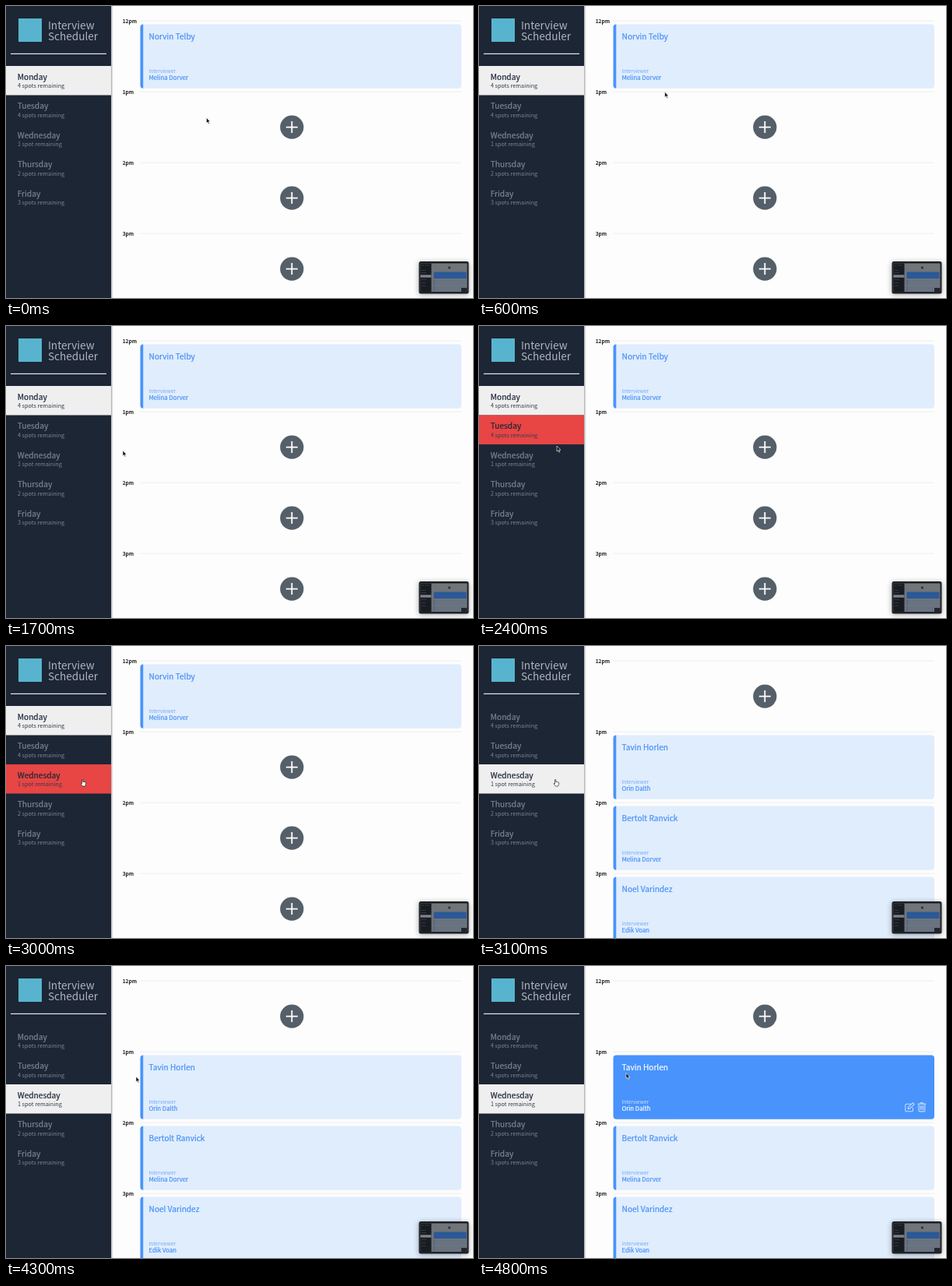
These frames come from a looping animation (600x375 px, 5 s). An HTML page:

```html
<!DOCTYPE html>
<html lang="en">
<head>
<meta charset="utf-8">
<title>Interview Scheduler</title>
<style>
  html, body { margin: 0; width: 100%; height: 100%; overflow: hidden; background: #fdfdfd; }
  svg { display: block; width: 600px; height: 375px; }
  text { font-family: "Noto Sans CJK JP", "Noto Sans CJK SC", "Noto Sans CJK", "Noto Sans", sans-serif; }
</style>
</head>
<body>
<svg id="stage" viewBox="0 0 600 375">
  <defs>
    <filter id="soft" x="-20%" y="-20%" width="140%" height="140%"><feGaussianBlur stdDeviation="1.3"/></filter>
    <filter id="glow" x="-30%" y="-40%" width="160%" height="180%"><feGaussianBlur stdDeviation="3.5"/></filter>
  </defs>
  <g id="schedule"></g>
  <g id="sidebar">
    <rect x="-6" y="-6" width="142" height="387" opacity=".4" filter="url(#soft)"/>
    <rect width="135" height="375" fill="#1c2635"/>
    <rect x="16" y="16" width="30" height="30" fill="#58b4ce"/>
    <g fill="#b0b6bd" font-size="13.6" font-weight="300">
      <text x="53.9" y="30">Interview</text>
      <text x="53.9" y="43.8">Scheduler</text>
    </g>
    <rect x="6" y="60.8" width="123" height="1.2" fill="#e4e6e8"/>
    <g id="days"></g>
  </g>
  <g id="preview">
    <rect x="530" y="329" width="65" height="42" rx="3" opacity=".3" filter="url(#glow)"/>
    <rect x="530.5" y="328" width="64" height="41.5" rx="2.5" fill="#1f2226"/>
    <rect x="532.5" y="330.5" width="60" height="36.5" fill="#717478"/>
    <rect x="532.5" y="330.5" width="14" height="36.5" fill="#171b22"/>
    <path d="M534 333h3m1 0h6M534 339.5h5M534 342.5h6M534 351.5h6M534 355.5h5M534 359.5h5" stroke="#3c424b" stroke-width=".8"/>
    <rect x="532.5" y="345.3" width="14" height="3.4" fill="#7f8184"/>
    <circle cx="569.5" cy="336" r="1.6" fill="#2c3239"/>
    <rect x="550" y="341.5" width="41.5" height="8.5" fill="#2b5896"/>
    <rect x="550" y="351.5" width="41.5" height="7" fill="#677282"/>
    <rect x="550" y="360" width="41.5" height="6" fill="#677282"/>
    <path d="M550 342v8m0 1.5v7m0 1.5v6" stroke="#2b5896" stroke-width=".7"/>
    <rect x="585" y="362" width="7.5" height="5" fill="#22262b"/>
  </g>
  <g id="pointer"></g>
</svg>
<script>
const LOOP = 5000, STEP = 100;
const byId = id => document.getElementById(id);

const days = [["Monday", 4], ["Tuesday", 4], ["Wednesday", 1], ["Thursday", 2], ["Friday", 3]];
const hours = ["12pm", "1pm", "2pm", "3pm"];
const bookings = {
  0: [["Norvin Telby", "Melina Dorver"], null, null, null],
  2: [null, ["Tavin Horlen", "Orin Dalth"], ["Bertolt Ranvick", "Melina Dorver"], ["Noel Varindez", "Edik Voan"]]
};

// Pointer stops: time in ms, x, y
const route = [
  [0, 257.5, 143.5], [100, 257.5, 143.5], [300, 252, 139], [400, 252, 139],
  [700, 232, 96], [1000, 205, 74], [1200, 169, 99.5], [1500, 150, 160],
  [1800, 150, 160], [2100, 117, 143], [2400, 100, 154], [2700, 98, 171.5],
  [3100, 98, 171.5], [3200, 104, 171], [3600, 140.5, 166], [3800, 156, 160.5],
  [4000, 156, 160.5], [4300, 167, 142], [4600, 189, 137.5], [LOOP, 189, 137.5]
];

function pointerAt(t) {
  const i = route.findIndex(stop => stop[0] > t);
  const [t0, x0, y0] = route[i - 1], [t1, x1, y1] = route[i];
  const k = (t - t0) / (t1 - t0);
  return [x0 + (x1 - x0) * k, y0 + (y1 - y0) * k];
}

const between = (t, from, to) => t >= from && t < to;

function text(x, y, size, fill, content, extra = "") {
  return `<text x="${x}" y="${y}" font-size="${size}" fill="${fill}" ${extra}>${content}</text>`;
}

// A hairline outline gives the medium weight between regular and bold
const medium = ink => `stroke="${ink}" stroke-width=".2"`;
const light = `font-weight="300"`;

function dayItem([name, spots], i, selected, hovered) {
  const y = 77 + 37.5 * i;
  const lit = i === selected || i === hovered;
  const back = i === selected ? "#efefef" : "#e84545";
  const ink = lit ? "#1c2635" : "#7d858f";
  return (lit ? `<rect y="${y}" width="135" height="37.5" fill="${back}"/>` : "") +
    text(14.7, y + 17.9, 10.2, ink, name, medium(ink)) +
    text(14.9, y + 28.1, 7.3, lit ? "#343d4a" : ink, `${spots} spot${spots > 1 ? "s" : ""} remaining`, light);
}

const cardIcons = `<g fill="none" stroke="#c6dcff" stroke-width="1.1" stroke-linejoin="round">
  <path d="M555 86.2h-5.8q-1.4 0-1.4 1.4v6.8q0 1.4 1.4 1.4h6.9q1.4 0 1.4-1.4v-3.3"/>
  <path d="M551.2 92.6l.5-2.5 5.6-5.4 1.9 1.9-5.6 5.5z"/>
  <path d="M563.8 86.1h10.2M567 85.9l.8-1.4h2.3l.8 1.4M564.9 86.3v8.2q0 1.4 1.3 1.4h5.4q1.3 0 1.3-1.4v-8.2M567 88.2v5.6M568.9 88.2v5.6M570.8 88.2v5.6"/>
</g>`;

function card([student, interviewer], hovered) {
  const ink = hovered ? "#fff" : "#458ff5";
  const face = hovered
    ? `<rect x="172.5" y="23.5" width="412.5" height="82.3" rx="4" fill="#4893fc"/>` + cardIcons
    : `<path d="M176.3 23.5H581q4 0 4 4v74.3q0 4-4 4H176.3z" fill="#e0edfd"/>
       <path d="M176.3 23.5q-3.8 0-3.8 4v74.3q0 4 3.8 4z" fill="#4893fc"/>`;
  return face +
    text(183.6, 42.7, 10.1, ink, student, medium(ink)) +
    text(183.4, 86.1, 6.5, hovered ? "#cfe2ff" : "#70a9f7", "Interviewer", light) +
    text(183.4, 95, 7.8, ink, interviewer, medium(ink));
}

const addButton = `<circle cx="367.3" cy="64.6" r="15.1" fill="#555f69"/>
  <path d="M359.8 64.6h15M367.3 57.1v15" stroke="#fff" stroke-width="1.8"/>`;

function slot(booking, i, hovered) {
  return `<g transform="translate(0 ${91 * i})">` +
    text(149.7, 21.9, 6.6, "#1b1b1b", hours[i], `font-weight="600"`) +
    `<path d="M172 19.2h413" stroke="#eee"/>` +
    (booking ? card(booking, hovered) : addButton) + "</g>";
}

const arrow = `<path d="M0 0v6.9l1.6-1.4 1.1 2.6 1.2-.5-1.1-2.5h2.1z" fill="#111" stroke="#fff" stroke-width=".6"/>`;
const hand = `<path d="M-.5.3q.7-.8 1.3 0v2.5l3.2.6q.8.3.7 1.2l-.5 2.4-.8 1.6H.4L-1.8 5.7q-.3-1 .4-.9l.9.7z" fill="#fff" stroke="#222" stroke-width=".7"/>`;

function setMarkup(id, markup) {
  const node = byId(id);
  if (node.markup !== markup) node.innerHTML = node.markup = markup;
}

function render(now) {
  const t = Math.floor((now % LOOP) / STEP) * STEP;
  const selected = t < 3100 ? 0 : 2;
  const hoveredDay = between(t, 2100, 2500) ? 1 : between(t, 2500, 3100) ? 2 : -1;
  const hoveredSlot = between(t, 700, 1300) ? 0 : t >= 4500 ? 1 : -1;
  const [x, y] = pointerAt(t);

  setMarkup("schedule", bookings[selected].map((b, i) => slot(b, i, i === hoveredSlot)).join(""));
  setMarkup("days", days.map((d, i) => dayItem(d, i, selected, hoveredDay)).join(""));
  setMarkup("pointer", between(t, 2500, 3300) ? hand : arrow);
  byId("pointer").setAttribute("transform", `translate(${x} ${y})`);
}

const start = performance.now();
function tick() {
  render(performance.now() - start);
  requestAnimationFrame(tick);
}
tick();
</script>
</body>
</html>
```
